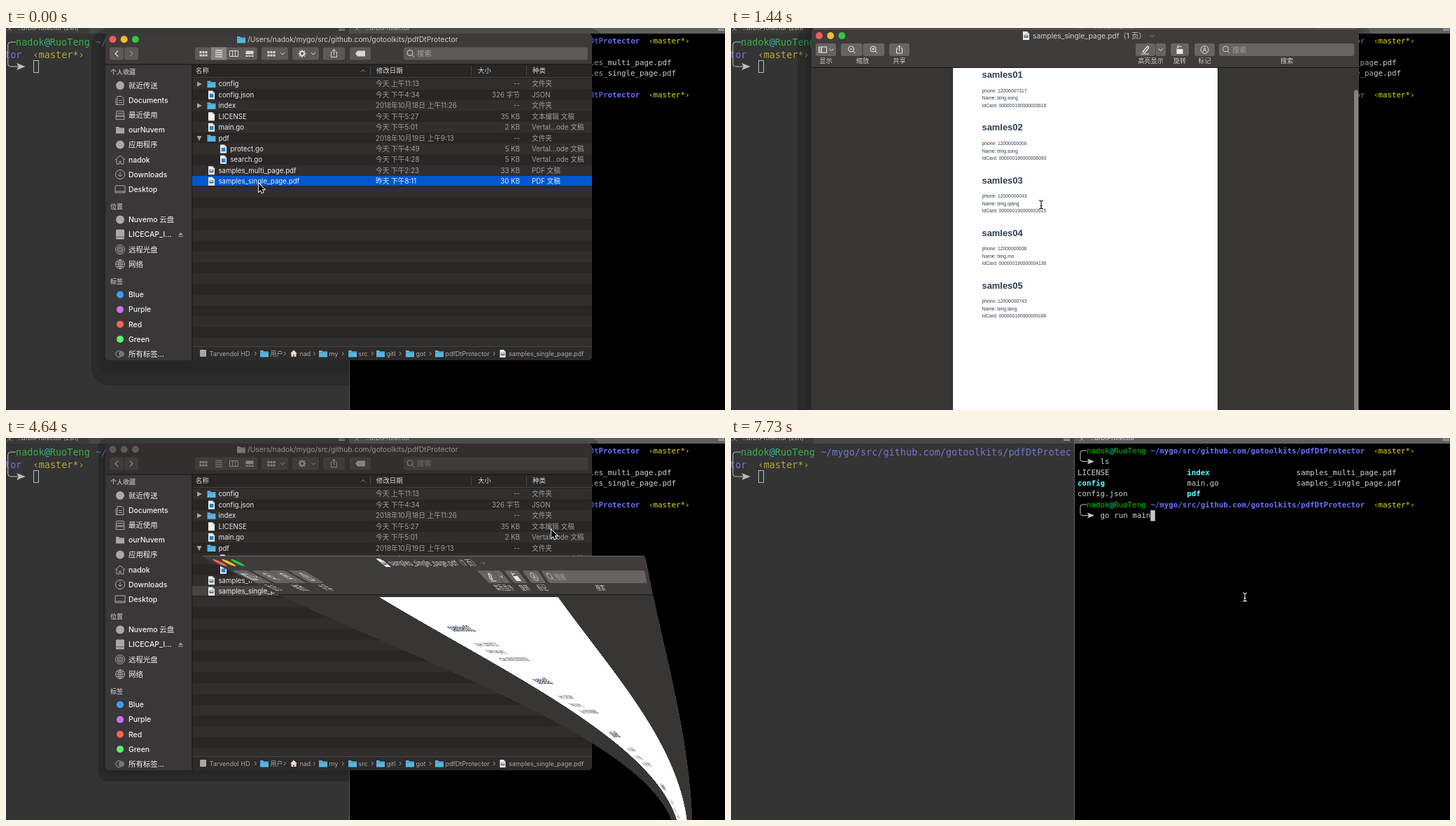
Animation, 1027 px wide and 545 px high, one loop 8000 ms. Source, as an HTML page with a canvas:

```html
<!DOCTYPE html>
<html lang="zh">
<head>
<meta charset="utf-8">
<title>Screen recording</title>
<style>
html, body { margin: 0; width: 100%; height: 100%; overflow: hidden; background: #000; }
canvas { display: block; }
</style>
</head>
<body>
<canvas id="stage" width="1027" height="545"></canvas>
<script>
const W = 1027, H = 545, LOOP = 8000;
const SANS = 'Inter, "Noto Sans CJK SC", "Noto Sans CJK", sans-serif';
const MONO = '"DejaVu Sans Mono", monospace';
const PAGE = '"Liberation Sans", sans-serif';
const USER = 'nadok', HOST = 'RuoTeng', DIR = 'mygo/src/github.com/gotoolkits/pdfDtProtector';
const PDF = 'samples_single_page.pdf';

const screen = document.getElementById('stage').getContext('2d');
screen.imageSmoothingQuality = 'high';
const sheet = document.createElement('canvas');
sheet.width = W; sheet.height = 620;
const sheetCtx = sheet.getContext('2d');
let c = screen;

// Tracks hold [start time, ...values]; each value stays until the next start.
const mouse = [[0, 361, 222], [800, 398, 232, 1], [1300, 420, 242, 1], [1440, 443, 252, 1],
  [3020, 300, 130], [3160, 188, 50], [3460, 170, 34], [3610, 152, 20], [3800, 141, 12],
  [4460, 180, 24], [4640, 779, 131], [4850, 880, 205], [5000, 927, 268, 1],
  [5500, 830, 246, 1], [5640, 734, 227, 1]];
const scroll = [[0, 32.3], [1300, 36], [1440, 38], [1920, 34], [2090, 28], [2280, 18.5], [2420, 0]];
const typed = [[0, 0], [6240, 1], [6390, 2], [6540, 3], [6690, 5], [6990, 6], [7290, 7], [7580, 9], [7730, 11]];
const ghost = [[0, 0], [150, 15], [370, 20], [590, 24], [800, 27], [970, 0]];
const genie = [[0, 0, 0], [4460, .4, 0], [4640, 1, 167], [4850, 1, 400]];
const at = (track, t) => track.findLast(k => k[0] <= t).slice(1);

function rect(x, y, w, h, color, r = 0) {
  c.fillStyle = color;
  c.beginPath(); c.roundRect(x, y, w, h, r); c.fill();
}
function dot(x, y, r, color) {
  c.fillStyle = color;
  c.beginPath(); c.arc(x, y, r, 0, 7); c.fill();
}
function text(s, x, y, size, color, font = SANS, weight = 400, align = 'left') {
  c.font = `${weight} ${size}px ${font}`;
  c.textAlign = align;
  c.fillStyle = color;
  c.fillText(s, x, y + size * .36);
}
function icon(d, x, y, color, line = 1, scale = 1) {
  c.save();
  c.translate(x, y); c.scale(scale, scale);
  const path = new Path2D(d);
  if (line) { c.lineWidth = line; c.strokeStyle = color; c.stroke(path); }
  else { c.fillStyle = color; c.fill(path); }
  c.restore();
}
function folder(x, y, color = '#57b5e2') {
  icon('M-6-4.5h4l1.5 1.5h6.5v8h-12z', x, y, color, 0);
  rect(x - 6, y - 1.8, 12, .8, 'rgba(0,0,0,.2)');
}
function doc(x, y, kind, scale = 1) {
  c.save();
  c.translate(x, y); c.scale(scale, scale);
  icon('M-4.5-6h6l3 3v9h-9z', 0, 0, '#f1f1f1', 0);
  icon('M1.5-6v3h3z', 0, 0, '#b9b9b9', 0);
  if (kind === 'code') rect(-2.7, -1.7, 5.6, 5.6, '#2482c4');
  if (kind === 'pdf') {
    rect(-3.2, -1.5, 6.4, 4.5, '#77818c', .6);
    rect(-2, -.5, 4, 1.3, '#dde3e8');
    rect(-2.5, 1.6, 5, .8, '#44505c');
  }
  c.restore();
}
function lights(x, y, colors, hover) {
  colors.forEach((color, i) => dot(x + i * 16.2, y, 5, color));
  if (!hover) return;
  icon('M-2-2L2 2M2-2L-2 2', x, y, '#6b0f0a');
  icon('M-3 0H3', x + 16.2, y, '#7a4a00', 1.3);
  icon('M-2-2L2 2', x + 32.4, y, '#0b5a10', 1.5);
}
function shadow(x, y, w, h, side, below) {
  rect(x - side, y - 8, w + side * 2, h + below + 8, 'rgba(0,0,0,.2)', side * 1.3);
  rect(x - side * .4, y, w + side * .8, h + below * .45, 'rgba(0,0,0,.1)', 8);
}
const SEARCH = 'M3-1A4 4 0 1 1-5-1A4 4 0 1 1 3-1M2 2L5 5';
const SHARE = 'M-2-2H-4V5H4V-2H2M0 2V-6M-2.5-3.5L0-6 2.5-3.5';
const DOWN = 'M-3-1.5L0 1.5 3-1.5';
const RING = 'M6.5 0A6.5 6.5 0 1 1-6.5 0A6.5 6.5 0 1 1 6.5 0';

// Terminals
function prompt(x, y, size, gap, colors, path) {
  const ch = size * .602, k = size / 10.82;
  icon(`M${9 * k} 0H${3 * k}Q0 0 0 ${3 * k}V${gap - 3 * k}Q0 ${gap} ${3 * k} ${gap}H${13 * k}`, x - 9 * k, y, colors[4]);
  icon('M-4-4L6 0-4 4-2 0z', x + 5 * k, y + gap, colors[4], 0, k);
  text(USER, x, y, size, colors[0], MONO);
  text('@', x + 5 * ch, y, size, colors[1], MONO);
  text(HOST, x + 6 * ch, y, size, colors[0], MONO);
  text(path, x + 14 * ch, y, size, colors[2], MONO, colors[5]);
}
function bars(x) {
  for (let i = 0; i < 3; i++) rect(x, i * 2 - 1, 9, 1, '#b5b5b5');
}
function terminals(t) {
  rect(0, 0, 490, H, '#343434');
  rect(0, 0, 490, 8, '#474747');
  rect(0, 0, 118, 8, '#3a3a3a');
  rect(490, 0, 1, H, '#5e5e5e');
  rect(491, 0, 536, H, '#000');
  rect(491, 0, 536, 8, '#5f5f5f');
  text('..dfDtProtector (zsh)', 17, 0, 9, '#b0b0b0');
  text('..dfDtProtector', 514, 0, 9, '#d5d5d5');
  icon('M-3-3L3 3M3-3L-3 3', 5, 1, '#999');
  icon('M-3-3L3 3M3-3L-3 3', 501, 1, '#aaa');
  bars(475); bars(1017);

  const dim = ['#35b14a', '#35b5b5', '#7474d2', '#b5a93a', '#bdbdbd', 400];
  prompt(14, 20, 13.52, 35, dim, '~/' + DIR.slice(0, -3));
  text('tor', -2, 38, 13.52, dim[2], MONO);
  text('‹master*›', 38.5, 38, 13.52, dim[3], MONO);
  c.strokeStyle = '#bbb'; c.lineWidth = 1;
  c.strokeRect(39.5, 46.5, 7, 17);

  const lit = ['#00c800', '#00c5c7', '#6d70ff', '#dfdd10', '#c7c7c7', 700];
  for (const y of [18, 95]) {
    prompt(508, y, 10.82, 15.4, lit, '~/' + DIR);
    text('‹master*›', 918, y, 10.82, lit[3], MONO);
  }
  text('ls', 527.6, 33.4, 10.82, '#d0d0d0', MONO);
  const list = [['LICENSE', 'index', 'samples_multi_page.pdf'], ['config', 'main.go', PDF], ['config.json', 'pdf']];
  list.forEach((row, r) => row.forEach((name, col) => {
    const isDir = /^(index|config|pdf)$/.test(name);
    text(name, 495 + col * 156.2, 48.7 + r * 15.4, 10.82, isDir ? '#5ff' : '#d0d0d0', MONO, isDir ? 700 : 400);
  }));
  const [n] = at(typed, t);
  text('go run main'.slice(0, n), 527.6, 110.6, 10.82, '#d0d0d0', MONO);
  rect(527.6 + n * 6.514, 103, 6.5, 15.5, '#c7c7c7');
}

// File browser
const places = [['就近传送', 82], ['Documents', 103.5], ['最近使用', 124.5], ['ourNuvem', 145.5], ['应用程序', 166.5],
  [USER, 188], ['Downloads', 209], ['Desktop', 230], ['Nuvemo 云盘', 273.5], ['LICECAP_I...', 294.5],
  ['远程光盘', 316], ['网络', 337]];
const placeIcons = ['', 'M-4-6h6l3 3v9h-9zM-6-3v9h8M-2 0h5M-2 3h5', 'M-5-6h10l1 8v4h-12v-4zM-6 2h12M-4-3h8M-5 0h10', 'folder', '',
  'M-7 0L0-6 7 0M-5-1V6H-1V2H1V6H5V-1', RING + 'M0-4V3M-3 0L0 3 3 0', 'M-7-5h14v10h-14zM-7 3h14', '', 'disk',
  RING + 'M2 0A2 2 0 1 1-2 0A2 2 0 1 1 2 0M4 0A4 4 0 1 1-4 0A4 4 0 1 1 4 0',
  RING + 'M-6.5 0H6.5M0-6.5V6.5M0-6.5Q-6 0 0 6.5Q6 0 0-6.5M-5-4Q0-1 5-4M-5 4Q0 1 5 4'];
const tags = [['Blue', '#3f9cff'], ['Purple', '#cb70ff'], ['Red', '#ff6259'], ['Green', '#5df06c']];
const CODE = 'Vertal...ode 文稿';
const files = [
  ['config', '今天 上午11:13', '--', '文件夹', 'closed'], ['config.json', '今天 下午4:34', '326 字节', 'JSON', 'code'],
  ['index', '2018年10月18日 上午11:26', '--', '文件夹', 'closed'], ['LICENSE', '今天 下午5:27', '35 KB', '文本编辑 文稿', 'plain'],
  ['main.go', '今天 下午5:01', '2 KB', CODE, 'code'], ['pdf', '2018年10月19日 上午9:13', '--', '文件夹', 'open'],
  ['protect.go', '今天 下午4:49', '5 KB', CODE, 'code', 17], ['search.go', '今天 下午4:28', '5 KB', CODE, 'code', 17],
  ['samples_multi_page.pdf', '今天 下午2:23', '33 KB', 'PDF 文稿', 'pdf'], [PDF, '昨天 下午8:11', '30 KB', 'PDF 文稿', 'pdf']];
const crumbs = [[282, 'Tarvendol HD', 356], [369, '用户', 398], [411, USER.slice(0, 3), 440], [453, 'my', 481],
  [495, 'src', 523], [535, 'gitl', 563], [577, 'got', 606], [619, 'pdfDtProtector', 697]];

function finder(active) {
  const x = 142, y = 8, w = 695, h = 466;
  shadow(x, y, w, h, active ? 20 : 10, active ? 36 : 16);
  c.save();
  c.beginPath(); c.roundRect(x, y, w, h, 5); c.clip();
  rect(x, y, w, h, '#393737');
  rect(x, y, w, 44, active ? '#3d3a39' : '#322f2e');
  rect(266, 52, 571, 403, '#292625');
  for (let i = 0; i < 25; i += 2) rect(266, 72.3 + i * 15.41, 571, 15.41, '#312e2d');
  rect(266, 52, 571, 19, '#292625');
  rect(266, 455, 571, 19, '#2d2a29');
  rect(266, 70, 571, 1, '#454241');
  rect(266, 454, 571, 1, '#454241');
  rect(x, 51.5, w, 1, '#151413');
  rect(265.5, 52, 1, 422, '#171616');

  lights(152.5, 16.3, active ? ['#fc5b57', '#f5bd2e', '#2fc841'] : Array(3).fill('#5c5a59'));
  const ink = active ? '#d9d7d6' : '#858280', key = active ? '#5c5958' : '#3f3c3b';
  folder(336, 16.5, active ? '#57b5e2' : '#777472');
  text(`/Users/${USER}/${DIR}`, 345, 16.5, 10.3, active ? '#cfcdcc' : '#93918f');
  for (const [left, width] of [[148, 20], [169, 20], [270, 89], [365, 38], [409, 38], [453, 31], [491, 30], [568, 263]])
    rect(left, 27.5, width, 18, key, 3);
  if (active) rect(293, 27.5, 22, 18, '#858281');
  icon('M2-4L-2 0 2 4', 158, 36.5, ink, 1.3);
  icon('M-2-4L2 0-2 4', 179, 36.5, '#878483', 1.3);
  for (const i of [0, 1, 2]) {
    for (const j of [0, 1]) {
      rect(276.5 + i * 4, 33 + j * 4.5, 3, 3, ink);
      rect(373.5 + i * 4, 33 + j * 4.5, 3, 3, ink);
    }
    rect(342.5 + i * 4, 39, 3, 2, ink);
  }
  icon('M-5-4.5H5M-5-1.5H5M-5 1.5H5M-5 4.5H5', 304, 36.5, active ? '#fff' : ink);
  icon('M-6-4h12v8h-12zM-2-4v8M2-4v8', 325.5, 36.5, ink);
  rect(342.5, 32.5, 11, 5, ink);
  icon(DOWN, 395, 36.5, ink); icon(DOWN, 439, 36.5, ink);
  icon('M3 0A3 3 0 1 1-3 0A3 3 0 1 1 3 0', 423, 36.5, ink, 2);
  icon('M0-5.5V-3M0 3V5.5M-5.5 0H-3M3 0H5.5M-4-4L-2-2M2 2L4 4M4-4L2-2M-2 2L-4 4', 423, 36.5, ink, 1.5);
  icon(SHARE, 468.5, 36.5, ink);
  icon('M-7 0L-4-4H7V4H-4z', 506, 36.5, ink, 0);
  icon(SEARCH, 578, 36.5, ink);
  text('搜索', 587, 36.5, 10.4, active ? '#a5a2a1' : '#6f6c6b');

  const grey = '#aaa8a7', bright = '#f4f3f2';
  for (const [label, cy] of [['个人收藏', 63], ['位置', 255], ['标签', 361.5]]) text(label, 149, cy, 9, grey, SANS, 600);
  places.forEach(([label, cy], i) => {
    const d = placeIcons[i];
    if (!d) dot(163, cy, 6, grey);
    else if (d === 'folder') folder(163, cy, grey);
    else if (d === 'disk') {
      rect(157, cy - 7, 12, 14, grey, 1.5);
      rect(157, cy + 3, 12, 1, '#555');
    } else icon(d, 163, cy, grey);
    text(label, 175, cy, 10.4, bright, SANS, 500);
  });
  icon('M-4 1L0-3 4 1zM-4 2.5h8v1.3h-8z', 249.5, 294.5, grey, 0, .85);
  tags.forEach(([label, color], i) => {
    dot(163, 380.5 + i * 21.15, 5, color);
    text(label, 175, 380.5 + i * 21.15, 10.4, bright, SANS, 500);
  });
  icon('M4 0A4.5 4.5 0 1 1-5 0A4.5 4.5 0 1 1 4 0', 162, 465, grey);
  dot(165, 465, 4, '#777473');
  text('所有标签...', 175, 465, 10.4, bright, SANS, 500);

  for (const [label, left] of [['名称', 271], ['修改日期', 529], ['大小', 674], ['种类', 752]]) text(label, left, 61, 9.4, '#dcdad9', SANS, 500);
  for (const left of [520, 664, 743]) rect(left, 54, 1, 14, '#474443');
  icon('M-3 1.5L0-1.5 3 1.5', 510, 61, '#8f8c8b');
  files.forEach(([name, date, size, kind, type, indent = 0], i) => {
    const cy = 80 + i * 15.41, chosen = name === PDF;
    if (chosen) rect(266, 211, 571, 14, active ? '#0058d0' : '#464342');
    const soft = chosen && active ? '#e3edfb' : '#a09d9c';
    if (type === 'closed') icon('M-3-3.5L4 0-3 3.5z', 276, cy, '#a5a2a1', 0);
    if (type === 'open') icon('M-3.5-3L0 4 3.5-3z', 276, cy, '#a5a2a1', 0);
    if (type === 'closed' || type === 'open') folder(293.5, cy);
    else doc(293.5 + indent, cy, type);
    text(name, 303.5 + indent, cy, 9.7, '#eceae9');
    text(date, 528, cy, 9.7, soft);
    text(size, 734, cy, 9.7, soft, SANS, 400, 'right');
    text(kind, 751, cy, 9.7, soft);
  });

  crumbs.forEach(([left, label, arrow], i) => {
    if (i === 0) rect(left - 5, 459, 9, 10, '#a9a7a6', 1);
    else if (i === 2) {
      icon('M-5 0L0-5 5 0H3.5V4.5H-3.5V0z', left, 464.5, '#e5ddd0', 0);
      rect(left - 1, 466, 2, 3, '#b3663e');
    } else folder(left, 464.5);
    text(label, left + 8.5, 464.5, 9, grey);
    icon('M-1-2.5L1.5 0-1 2.5', arrow, 464.5, grey);
  });
  doc(709.5, 464.5, 'pdf', .9);
  text(PDF, 718, 464.5, 9, grey);
  c.restore();
}

// Document viewer
const people = [['12000007317', 'bing.song', '000000190000003618'], ['12000000000', 'bing.song', '000000190000006093'],
  ['12000000043', 'bing.qiang', '000000190000002615'], ['12000000638', 'bing.mo', '000000190000004136'],
  ['12000000743', 'bing.tang', '000000190000009186']];

function viewer(t) {
  const [offset] = at(scroll, t);
  c.clearRect(0, 0, W, 620);
  c.save();
  c.beginPath(); c.roundRect(115, 1, 782, 619, 5); c.clip();
  rect(115, 1, 782, 619, '#383634');
  c.save();
  c.beginPath(); c.rect(115, 57, 782, 563); c.clip();
  rect(316, 60 - offset, 380, 600, '#2a2827');
  rect(317, 60 - offset, 378, 600, '#fefefe');
  people.forEach(([phone, name, id], i) => {
    const y = 104.7 - offset + i * 75.1;
    text('samles0' + (i + 1), 358.5, y, 12.9, '#2c3e50', PAGE, 700);
    text('phone: ' + phone, 358.5, y + 22.7, 6.78, '#34404c', PAGE);
    text('Name: ' + name, 358.5, y + 33.3, 6.78, '#34404c', PAGE);
    text('IdCard: ' + id, 358.5, y + 43.8, 6.78, '#34404c', PAGE);
  });
  if (t >= 1300 && t < 3460) rect(890, 60 + offset * .75, 6, 560, '#858382', 3);
  c.restore();

  rect(115, 1, 782, 55, '#3f3c3b');
  rect(115, 1, 782, 1, '#6a6766');
  rect(115, 56, 782, 1, '#1a1918');
  lights(126, 11, ['#fc5b57', '#f5bd2e', '#2fc841'], t >= 3800 && t < 4640);
  doc(421.5, 11, 'pdf');
  text(PDF + '（1 页）', 431, 11, 10.35, '#d2d0cf');
  icon(DOWN, 601.5, 11.5, '#8f8c8b');
  for (const [left, width] of [[121, 29], [157, 30.5], [188.5, 30.5], [226, 29], [578, 28], [606.5, 14.5], [628, 26], [662, 29], [697, 193]])
    rect(left, 22, width, 18, '#676463', 3);
  const ink = '#eceae9';
  icon('M-6-4h11v8h-11zM-2-4v8M-5-2h2M-5 0h2M-5 2h2', 131.5, 31, ink);
  icon(DOWN, 143.5, 31, ink);
  for (const [left, sign] of [[172.5, 'M-3-1H1'], [204, 'M-3-1H1M-1-3V1']]) icon(SEARCH + sign, left, 31, ink);
  icon(SHARE, 240.5, 31, ink);
  icon('M-4 3L3-5 5-3-1 4zM-6 6H5', 592, 31, ink, 1.2);
  icon(DOWN, 613.5, 31, ink);
  rect(636.5, 30, 9, 7, ink);
  icon('M-4 0Q-3-4 3-3M-1-6L-4-3-1-1', 641, 29.5, ink);
  icon(RING + 'M-3 4L0-4 3 4M-1.5 1H1.5', 676.5, 31, ink, 1, .85);
  icon(SEARCH, 707.5, 31, '#cfcdcc');
  text('搜索', 716, 31, 10.2, '#a3a09f');
  for (const [label, cx] of [['显示', 135.5], ['缩放', 188], ['共享', 240.5], ['高亮显示', 599.5], ['旋转', 641], ['标记', 676.5], ['搜索', 794]])
    text(label, cx, 47, 9.2, '#cfcdcc', SANS, 400, 'center');
  c.restore();
}

// Bends each row of the window towards a point below the screen.
function drawBent(bend, shift) {
  for (let y = shift; y < H; y++) {
    const s = (1 - Math.cos(Math.PI * y / 577)) / 2 * bend;
    const left = 115 + 842 * s, right = 897 + 84 * s;
    c.drawImage(sheet, 115, y - shift, 782, 1, left, y, right - left, 1);
  }
}
function showViewer(t) {
  c = sheetCtx;
  viewer(t);
  c = screen;
  const [bend, shift] = at(genie, t);
  if (bend) return drawBent(bend, shift);
  if (t >= 800) {
    shadow(115, 1, 782, 619, 20, 36);
    return c.drawImage(sheet, 0, 0);
  }
  c.save();
  c.globalAlpha = .85;
  c.translate(506, 300); c.scale(.95, .95); c.translate(-506, -300);
  c.drawImage(sheet, 0, 0);
  c.restore();
}

function pointer(x, y, beam) {
  if (beam) {
    const d = 'M-3-6Q0-6 0-4Q0-6 3-6M0-4V4M-3 6Q0 6 0 4Q0 6 3 6M-1.5 1.5H1.5';
    const light = x > 317 && x < 695;
    icon(d, x, y, light ? '#fff' : '#000', 2.6);
    icon(d, x, y, light ? '#111' : '#eee', 1.1);
    return;
  }
  const d = 'M0 0V11.5L2.7 9 4.5 13.2 6.5 12.3 4.7 8.3H8.3z';
  icon(d, x, y, '#fff', 1.8);
  icon(d, x, y, '#000', 0);
}

function frame(now) {
  const t = now % LOOP;
  terminals(t);
  if (t < 5150) finder(t < 590);
  if (t >= 590 && t < 5000) showViewer(t);
  const [size] = at(ghost, t);
  if (size) {
    c.globalAlpha = .85;
    doc(294, 217, 'pdf', size / 9.2);
    c.globalAlpha = 1;
  }
  pointer(...at(mouse, t));
  requestAnimationFrame(frame);
}
requestAnimationFrame(frame);
</script>
</body>
</html>
```
